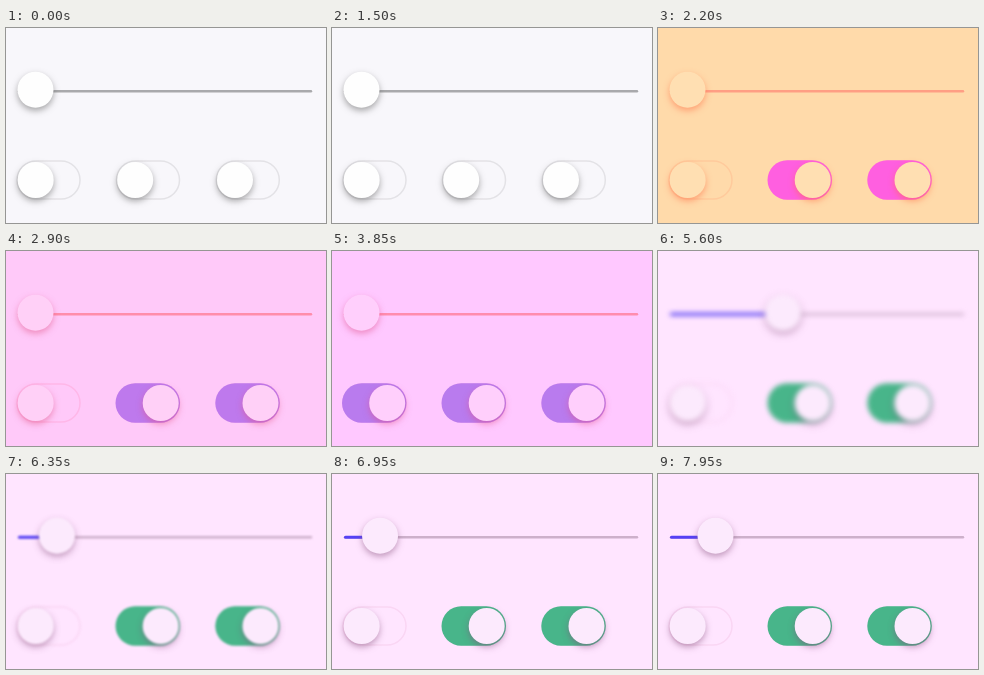
These frames come from a looping animation (320x195 px, 8000 ms). An HTML page with a canvas:

```html
<!DOCTYPE html>
<html>
<head>
<meta charset="utf-8">
<style>
  html, body { margin: 0; width: 100%; height: 100%; overflow: hidden; }
  canvas { display: block; width: 320px; height: 195px; }
</style>
</head>
<body>
<canvas id="stage"></canvas>
<script>
const LOOP = 8000;
const canvas = document.getElementById('stage');
const ctx = canvas.getContext('2d');
const ratio = window.devicePixelRatio || 1;
canvas.width = 320 * ratio;
canvas.height = 195 * ratio;

const rgb = hex => [1, 3, 5].map(i => parseInt(hex.slice(i, i + 2), 16));
const theme = (...colors) => colors.flatMap(rgb);

// background, knob, line, outline, switched on, shadow
const white = theme('#f8f7fb', '#fefefe', '#a9a9ac', '#e3e2e6', '#ff5fe0', '#555555');
const peach = theme('#ffdaaa', '#ffdfb2', '#ff9e84', '#ffca9c', '#ff5fe0', '#ff6a40');
const pink  = theme('#ffc8ff', '#ffcffc', '#ff8cae', '#ffb5ee', '#b97bee', '#e0508c');
const blush = theme('#ffe5ff', '#fceafd', '#cdb0cb', '#fad6f4', '#48b58a', '#85507c');

const tracks = {
  theme: [[1500, white], [2100, peach], [2400, peach], [3000, pink], [4100, pink], [4700, blush]],
  slider: [[4100, 29.5], [4800, 85], [4950, 85], [5600, 125], [6350, 51], [7000, 48], [7600, 57.5]],
  blur: [[4900, 0], [5600, 2.6], [6350, 0.9], [6900, 0.6], [7500, 0]],
  first: [[3200, 0], [3600, 1], [4100, 1], [4500, 0]],
  others: [[1550, 0], [2000, 1]]
};

function sample(keys, time) {
  const next = keys.findIndex(key => key[0] > time);
  if (next === 0) return keys[0][1];
  if (next < 0) return keys[keys.length - 1][1];
  const [t0, a] = keys[next - 1], [t1, b] = keys[next];
  const p = (time - t0) / (t1 - t0), e = p * p * (3 - 2 * p);
  const mix = (u, v) => u + (v - u) * e;
  return Array.isArray(a) ? a.map((v, i) => mix(v, b[i])) : mix(a, b);
}

function line(x0, x1, color, width) {
  ctx.beginPath();
  ctx.moveTo(x0, 63.2);
  ctx.lineTo(x1, 63.2);
  ctx.lineCap = 'round';
  ctx.lineWidth = width;
  ctx.strokeStyle = color;
  ctx.stroke();
}

function knob(x, y, color, shadow) {
  ctx.save();
  ctx.shadowColor = shadow;
  ctx.shadowBlur = 6 * ratio;
  ctx.shadowOffsetY = 3 * ratio;
  ctx.fillStyle = color;
  ctx.beginPath();
  ctx.arc(x, y, 18, 0, Math.PI * 2);
  ctx.fill();
  ctx.restore();
}

function toggle(x, on, colors) {
  ctx.beginPath();
  ctx.roundRect(x + 1, 133, 63, 38, 19);
  ctx.lineWidth = 1.5;
  ctx.strokeStyle = colors.outline;
  ctx.stroke();
  ctx.globalAlpha = on;
  ctx.beginPath();
  ctx.roundRect(x, 132.3, 64.5, 39.4, 19.7);
  ctx.fillStyle = colors.on;
  ctx.fill();
  ctx.globalAlpha = 1;
  knob(x + 19.7 + 25.5 * on, 152, colors.knob, colors.shadow);
}

function draw(now) {
  const time = now % LOOP;
  const at = name => sample(tracks[name], time);
  const values = at('theme').map(Math.round);
  const pick = (i, alpha = 1) => `rgba(${values.slice(i * 3, i * 3 + 3)},${alpha})`;
  const colors = { knob: pick(1), outline: pick(3), on: pick(4), shadow: pick(5, 0.5) };
  const slider = at('slider'), blur = at('blur');

  document.body.style.background = pick(0);
  canvas.style.filter = blur ? `blur(${blur}px)` : 'none';
  ctx.setTransform(ratio, 0, 0, ratio, 0, 0);
  ctx.clearRect(0, 0, 320, 195);

  line(13, 305, pick(2), 2.4);
  if (slider > 30) line(13.5, slider, '#5540f5', 3);
  knob(slider, 61.7, colors.knob, colors.shadow);
  [10, 109.5, 209.3].forEach((x, i) => toggle(x, at(i ? 'others' : 'first'), colors));
  requestAnimationFrame(draw);
}
requestAnimationFrame(draw);
</script>
</body>
</html>
```
